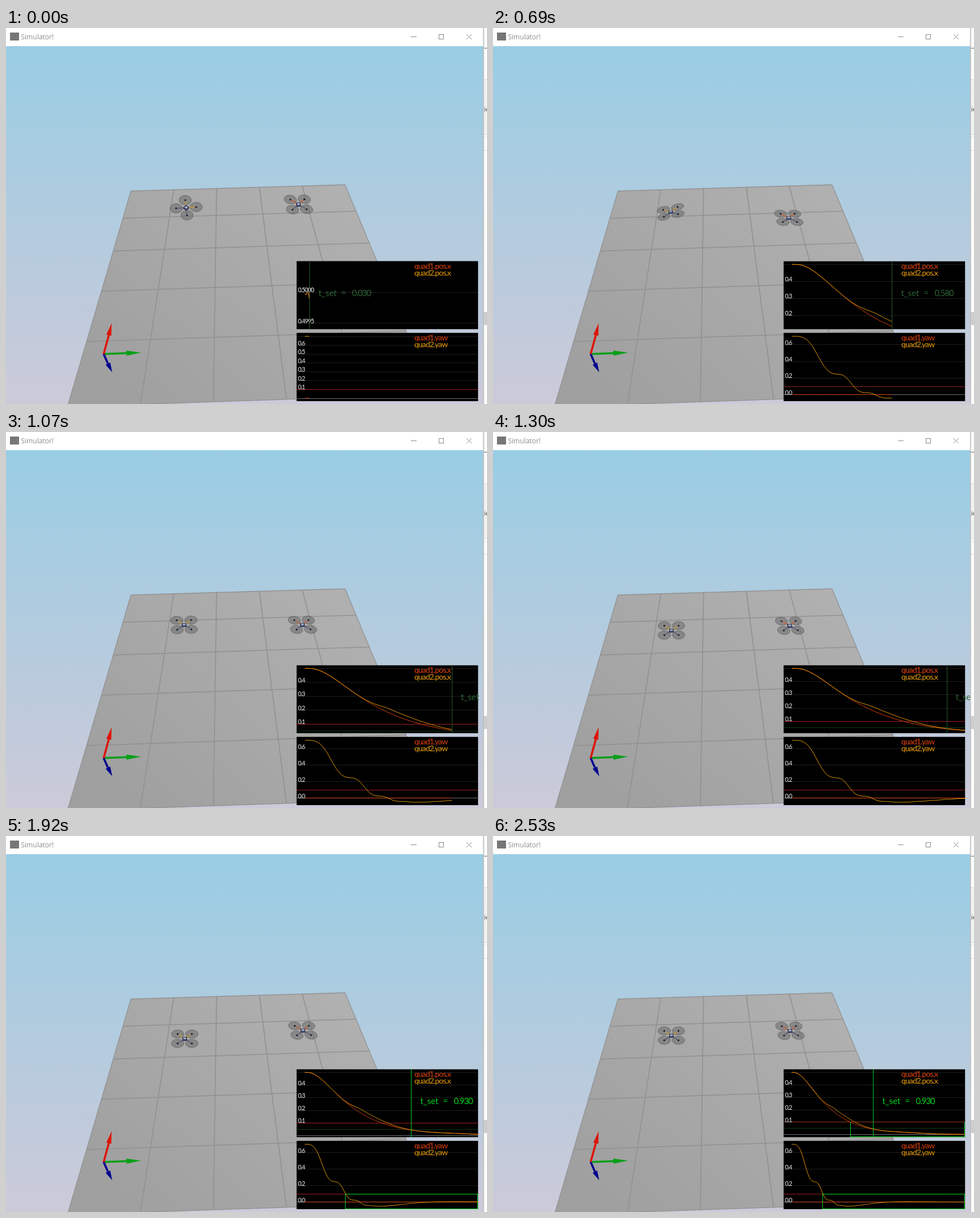
Recreate the animation shown at these times as an HTML page with a canvas. Size 847x662 px, loop 2610 ms.

```html
<!DOCTYPE html>
<html lang="en">
<head>
<meta charset="utf-8">
<title>Simulator!</title>
<style>
  html, body { margin: 0; width: 100%; height: 100%; overflow: hidden; background: #fff; }
  canvas { display: block; }
</style>
</head>
<body>
<canvas id="stage" width="847" height="662"></canvas>
<script>
const ctx = document.getElementById('stage').getContext('2d');
const { PI, exp, cos, sin, max, min, round } = Math;
const LOOP = 2610, STEPS = 34;
const RED = '#e0400c', ORANGE = '#e89c08', DIM = '#2f6333', BRIGHT = '#00d41c';

const lerp = (a, b, u) => a + (b - a) * u;
const mix = (p, q, u) => [lerp(p[0], q[0], u), lerp(p[1], q[1], u)];
const bell = (x, mid, left, right) => exp(-(((x - mid) / (x < mid ? left : right)) ** 2));

// Simulated seconds at a display step; the render speed varies a little.
function simTime(step) {
  const keys = [[0, .03], [9, .58], [14, .852], [20, 1.234], [33, 1.976]];
  const i = max(1, keys.findIndex(key => key[0] >= step));
  const [k0, t0] = keys[i - 1], [k1, t1] = keys[i];
  return Math.floor(lerp(t0, t1, (step - k0) / (k1 - k0)) * 100 + 1e-6) / 100;
}

// Critically damped approach to zero, with a short lag while the drone tilts.
function pos1(t) {
  const lag = .033 * bell(t, 0, 1, .28) * (1 - exp(-t / .02));
  const x = (t - lag) / .224;
  return .5 * exp(-x) * (1 + x) + .007 * bell(t, 1.3, .3, .3);
}
const pos2 = t => pos1(t) + .03 * bell(t, .5, .1, .28);

const yaw1 = () => 0;
// Underdamped decay whose time runs unevenly, which gives the steps in the curve.
function yaw2(t) {
  const u = t - .07;
  const wobble = .05 * exp(-2 * t) * cos(2 * PI * (2.63 * u + 5.9 * u * u));
  const s = max(0, t + .01 - wobble), w = 4.76, a = 3.97;
  return .7 * exp(-a * s) * (cos(w * s) + a / w * sin(w * s));
}

function box(color, x, y, w, h) {
  ctx.fillStyle = color;
  ctx.fillRect(x, y, w, h);
}

function path(points, close) {
  ctx.beginPath();
  points.forEach(([x, y]) => ctx.lineTo(x, y));
  if (close) ctx.closePath();
}

function line(color, width, ...points) {
  path(points);
  ctx.strokeStyle = color;
  ctx.lineWidth = width;
  ctx.stroke();
}

function poly(color, ...points) {
  path(points, true);
  ctx.fillStyle = color;
  ctx.fill();
}

function text(str, x, y, color, size, spacing = 0, family = 'Lato') {
  ctx.font = `${size}px ${family}, sans-serif`;
  ctx.letterSpacing = spacing + 'px';
  ctx.fillStyle = color;
  ctx.fillText(str, x, y);
}

function gradient(x0, y0, x1, y1, from, to) {
  const g = ctx.createLinearGradient(x0, y0, x1, y1);
  g.addColorStop(0, from);
  g.addColorStop(1, to);
  return g;
}

function drawWindow() {
  box('#fdfdfd', 0, 0, 847, 662);
  box('#f3f3f3', 840, 91, 7, 96);
  for (const y of [90, 187, 192, 215]) box('#dcdcdc', 840, y, 7, 1);
  box('#555', 840, 35, 7, 1);
  box('#cbcbcb', 840, 500, 7, 23);
  text('tie', 838, 147, '#333', 11, 0, 'Open Sans');
  box(gradient(840, 0, 844, 0, '#a4a4a4', 'rgba(255,255,255,0)'), 840, 0, 4, 662);
  box('#fff', 0, 0, 840, 32);
  box('#777', 7, 8, 16, 14);
  text('Simulator!', 26.5, 20, '#8c8c8c', 12, 0, 'Open Sans');
  line('#8a8a8a', 1, [713, 15.5], [723, 15.5]);
  ctx.strokeRect(762.5, 11.5, 8, 8);
  line('#8a8a8a', 1, [811, 11], [820, 20]);
  line('#8a8a8a', 1, [820, 11], [811, 20]);
}

function arrow(color, tip, neck) {
  const base = [172, 574], half = 4.5;
  const dx = tip[0] - neck[0], dy = tip[1] - neck[1], len = Math.hypot(dx, dy);
  const nx = -dy / len * half, ny = dx / len * half;
  line(color, 3.6, base, neck);
  poly(color, tip, [neck[0] + nx, neck[1] + ny], [neck[0] - nx, neck[1] - ny]);
}

function drawScene() {
  box(gradient(0, 32, 0, 662, '#99cde4', '#cccad9'), 0, 32, 840, 630);
  const [a, b, c, d] = [[220, 287], [597, 276], [751, 645], [108, 667]];
  poly(gradient(560, 270, 200, 670, '#b0b0b0', '#9f9f9f'), a, b, c, d);
  for (let i = 0; i <= 5; i++) {
    const u = i / 5, depth = .577 * u / (1 - .423 * u);
    const width = i % 5 ? 1.7 : 1.3;
    line('#929292', width, mix(a, b, u), mix(d, c, u));
    line('#929292', width, mix(a, d, depth), mix(b, c, depth));
  }
  arrow('#0a9f18', [238, 571.5], [212, 572.5]);
  arrow('#00008f', [187, 606], [179.5, 591]);
  arrow('#de1408', [186, 520], [181, 541]);
}

// heading turns the arms, flat squashes them with the tilt, roll leans them sideways.
function drawDrone(x, y, heading, flat, roll, frontColor) {
  const arms = [-135, -45, 45, 135].map(deg => {
    const angle = deg * PI / 180 + heading, ax = 17.7 * cos(angle);
    return [ax, 17.7 * flat * sin(angle) + roll * ax];
  });
  const at = ([ax, ay], s, dy = 0) => [x + ax * s, y + ay * s + dy];
  for (const arm of arms) {
    ctx.save();
    ctx.transform(...arms[0], ...arms[1], ...at(arm, 1));
    ctx.beginPath();
    ctx.arc(0, 0, .62, 0, PI * 2);
    ctx.restore();
    ctx.fillStyle = 'rgba(105,105,105,.55)';
    ctx.fill();
    ctx.strokeStyle = '#6c6c6c';
    ctx.lineWidth = 1;
    ctx.stroke();
  }
  arms.forEach((arm, i) =>
    line(i === 0 || i === 1 ? frontColor : '#5a5c78', 1.5, [x, y], at(arm, .85)));
  for (const arm of arms) {
    ctx.beginPath();
    ctx.arc(...at(arm, 1), 1.6, 0, PI * 2);
    ctx.fillStyle = '#1c1c28';
    ctx.fill();
  }
  poly('#34375e', ...arms.map(arm => at(arm, .32, 1.2)));
  poly('#34374a', ...arms.map(arm => at(arm, .32, -.5)));
  poly('#9aa8cc', ...arms.map(arm => at(arm, .2, -.5)));
}

function drawDrones(step, t) {
  const progress = 1 - 2 * pos1(t);
  const speedUp = .27 * bell(step, 2, 2, 1.2), brake = .52 * bell(step, 5.3, 1.6, 3.3);
  const tilt = speedUp - brake;
  const drop = 7.5 * bell(t, 1.38, .3, .35) - 18 * bell(t, .58, .3, .3);
  drawDrone(317.3 - 3.3 * progress + .11 * drop, 317 + 34 * progress + drop,
    yaw2(t), .66 + tilt, -.25 * bell(step, 7.5, 3, 2.5), '#cf9a2c');
  drawDrone(515 + 7.9 * progress, 310.6 + 32.4 * progress,
    -.16, .65 + .55 * tilt, .09, '#d2582a');
}

function drawPlot(plot, now) {
  const { top, bottom, y0, series, names, goal, settle } = plot;
  const LEFT = 511.5, RIGHT = 831.5, WIDTH = RIGHT - LEFT, SPAN = 109;
  const scale = 306 / max(1, now);
  const toX = t => 525 + t * scale;
  const times = [];
  for (let t = .005; t < now; t += .005) times.push(t);
  times.push(now);
  const curves = series.map(curve => times.map(curve));
  let hi = max(...curves.flat()), lo = min(...curves.flat());
  if (hi - lo < .001) {
    const mid = (hi + lo) / 2;
    hi = mid + .0005;
    lo = mid - .0005;
  }
  const range = hi - lo;
  const toY = v => y0 + (hi - v) / range * SPAN;
  const decade = 10 ** Math.floor(Math.log10(range + 1e-9));
  const ratio = range / decade;
  const spacing = decade * (ratio < 3 ? .5 : ratio > 7.05 ? 2 : 1);
  const digits = Math.ceil(-Math.log10(spacing) - 1e-6);

  ctx.save();
  ctx.beginPath();
  ctx.rect(LEFT, top, WIDTH, bottom - top);
  ctx.clip();
  box('#000', LEFT, top, WIDTH, bottom - top);
  const level = (v, color) => box(color, LEFT, round(toY(v)), WIDTH, 1);
  const ticks = [];
  for (let n = Math.ceil((lo - range / 8) / spacing); n * spacing < hi + range / 8; n++) {
    ticks.push(n * spacing);
  }
  ticks.forEach(v => level(v, '#1e1e1e'));
  level(0, '#6e6e6e');
  if (goal) level(goal, '#123a18');
  level(.1, '#9c1f22');

  // A limit counts as settled after one second inside it.
  if (now >= settle + 1) {
    const x = round(toX(settle)) + .5, y = round(toY(.1)) + .5;
    ctx.strokeStyle = BRIGHT;
    ctx.lineWidth = 1;
    ctx.strokeRect(x, y, 830.5 - x, Math.floor(bottom) - .5 - y);
    if (goal) level(.1, '#9c3a1c');
  }
  curves.forEach((values, i) =>
    line(i ? ORANGE : RED, 1, ...values.map((v, n) => [toX(times[n]), toY(v) + .3])));
  for (const v of ticks) {
    const y = toY(v);
    if (y > y0 + 3 && y < y0 + SPAN - 1) {
      text(Math.abs(v).toFixed(digits), 514, y + .5, '#ececec', 11, -1.1);
    }
  }
  names.forEach((name, i) =>
    text(name, 719, top + 13 + i * 12.2, i ? ORANGE : RED, 14, -.9));
  ctx.restore();

  if (goal) {
    const set = min(now, .93), x = toX(set), done = now >= 1.43;
    const color = done ? BRIGHT : DIM;
    box(done ? '#00b41a' : '#214d26', round(x), top, 1.2, bottom - top);
    ctx.save();
    ctx.beginPath();
    ctx.rect(0, 0, 840, 662);
    ctx.clip();
    text('t_set', x + 16, 471.5, color, 15);
    text('=', x + 56, 471.5, color, 15);
    text(set.toFixed(3), x + 75, 471.5, color, 15, -1);
    ctx.restore();
  }
}

const plots = [
  { top: 410.5, bottom: 530.5, y0: 416, series: [pos1, pos2],
    names: ['quad1.pos.x', 'quad2.pos.x'], goal: .05, settle: .671 },
  { top: 536.5, bottom: 657, y0: 542.5, series: [yaw1, yaw2],
    names: ['quad1.yaw', 'quad2.yaw'], settle: .355 }];

function draw(step) {
  const now = simTime(step);
  drawWindow();
  drawScene();
  drawDrones(step, now);
  plots.forEach(plot => drawPlot(plot, now));
}

let start = null, shown = -1;
function tick(now) {
  if (start === null) start = now;
  const t = Math.floor((now - start) % LOOP / 10) * 10;
  const step = Math.floor((t + 9.99) / (LOOP / STEPS));
  if (step !== shown) draw(shown = step);
  requestAnimationFrame(tick);
}
draw(0);
requestAnimationFrame(tick);
</script>
</body>
</html>
```
